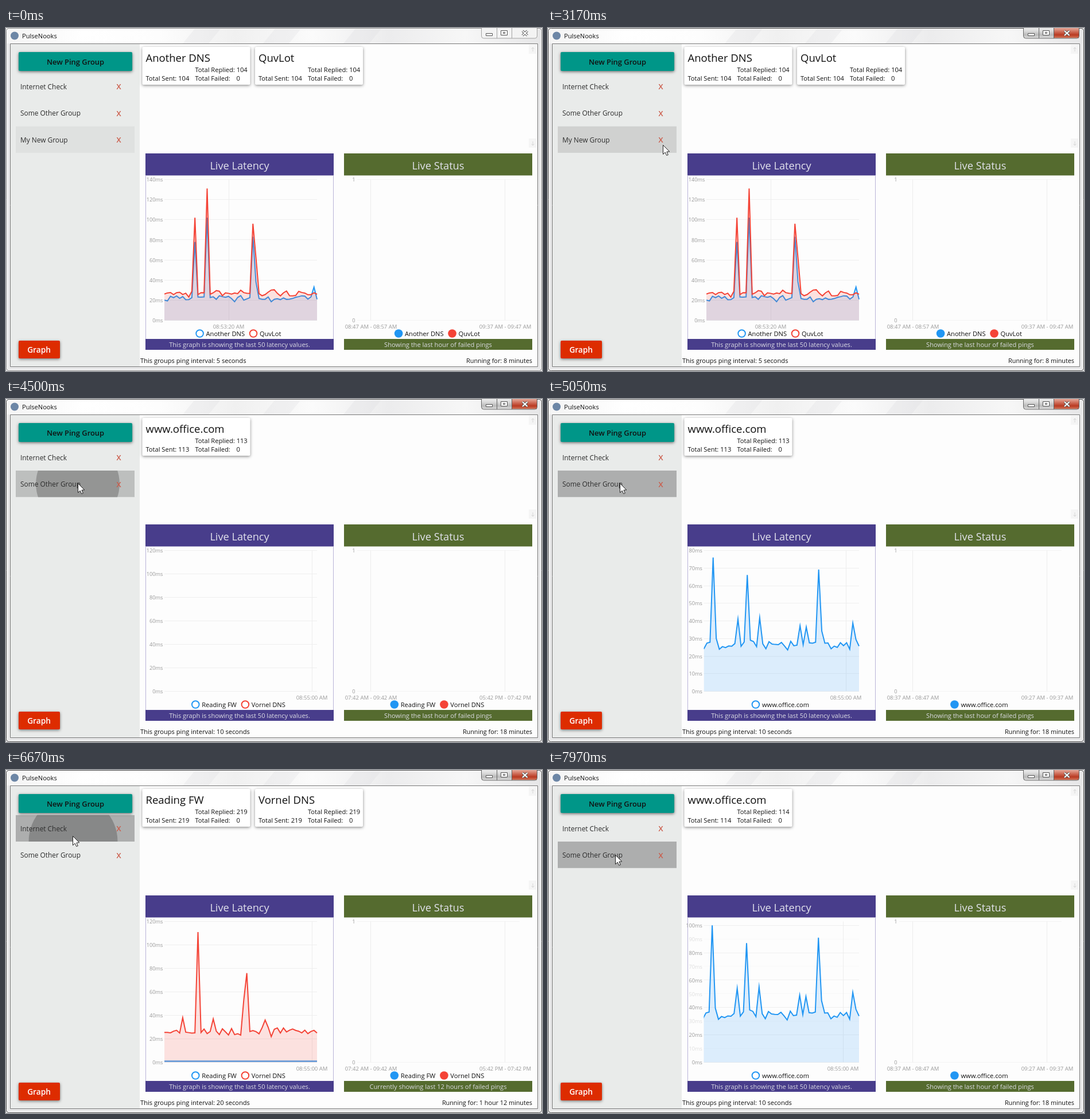
Recreate the animation shown at these times as an HTML page with a canvas. Size 934 px wide and 599 px high, loop 8 s.

```html
<!DOCTYPE html>
<html lang="en">
<head>
<meta charset="utf-8">
<title>Ping monitor</title>
<style>
html, body { margin: 0; width: 100%; height: 100%; overflow: hidden; background: #fff; }
canvas { display: block; }
</style>
</head>
<body>
<canvas id="stage" width="934" height="599"></canvas>
<script>
const ctx = document.getElementById('stage').getContext('2d');
const LOOP = 8000, STEPS = 50, BASE = 510.5, PLOT_HEIGHT = 246, PLOT_RIGHT = 542;
const BLUE = '#2196f3', RED = '#f44336', GREY = '#999';
const FACE = '"Open Sans", "Noto Sans", sans-serif';

const clamp = v => Math.max(0, Math.min(1, v));
const ramp = (t, from, to) => clamp((t - from) / (to - from));
const smooth = p => p * p * (3 - 2 * p);
const easeOut = p => 1 - (1 - p) ** 2;
const latest = (list, t) => list.filter(item => item.from <= t).pop();

// Latency wobbles around a base value; spikes are set by sample index.
function series(seed, base, spread, spikes = {}) {
  const random = () => (seed = seed * 16807 % 2147483647) / 2147483647;
  return Array.from({ length: STEPS + 1 }, (_, i) => {
    const wobble = base + spread * (random() + random() - 1);
    return spikes[i] ?? wobble;
  });
}

const dnsA = series(711, 22, 4, { 10: 78, 14: 102, 29: 83, 30: 38, 49: 33 });
const hubA = series(523, 27, 4, { 10: 102, 14: 131, 29: 96, 30: 62 });
const firewall = series(1, 1, 0);
const dnsB = series(919, 26, 5, { 6: 38, 11: 111, 16: 37, 26: 53, 27: 76, 33: 36 });
const office = series(337, 35, 5, { 3: 100, 11: 54, 14: 87, 18: 55, 31: 49, 33: 48, 37: 91, 38: 45, 48: 51 });

const HOUR = 'Showing the last hour of failed pings';
const HALF_DAY = 'Currently showing last 12 hours of failed pings';
const groupA = { names: ['Another DNS', 'QuvLot'], every: 5, run: '8 minutes', note: HOUR };
const groupB = { names: ['Reading FW', 'Vornel DNS'], every: 20, run: '1 hour 12 minutes', note: HALF_DAY };
const groupC = { names: ['www.office.com'], every: 10, run: '18 minutes', note: HOUR };

const viewA = { names: groupA.names, data: [dnsA, hubA], top: 140, step: 20, left: 276, tick: 388, time: '08:53:20 AM',
  spans: ['08:47 AM - 08:57 AM', '09:37 AM - 09:47 AM'] };
const viewB = { names: groupB.names, data: [firewall, dnsB], top: 120, step: 20, left: 276, tick: 533, time: '08:55:00 AM',
  spans: ['07:42 AM - 09:42 AM', '05:42 PM - 07:42 PM'] };
const viewC = { names: groupC.names, data: [office.map(v => v * 0.76)], top: 80, step: 10, left: 271.5, tick: 519,
  time: '08:55:00 AM', spans: ['08:37 AM - 08:47 AM', '09:27 AM - 09:37 AM'] };
const viewD = { ...viewC, data: [office], top: 102.8, step: 20, faintStep: 10, tick: 514, slide: 1.7 };

// A click swaps the cards and clears the chart; the new chart loads later.
const clicks = [
  { from: 0, group: groupA, count: 104, view: viewA, load: -500 },
  { from: 3340, group: groupB, count: 219, view: viewB, load: 3950 },
  { from: 4400, group: groupC, count: 113, view: viewC, load: 4710 },
  { from: 5590, group: groupB, count: 219, view: viewB, load: 6190 },
  { from: 7130, group: groupC, count: 114, view: viewD, load: 7890, rise: 80 }
];

const cursorMoves = [
  { from: 680, to: 980, x: 410, y: 530 },
  { from: 1150, to: 1460, x: 199, y: 365 },
  { from: 1610, to: 1690, x: 189, y: 264 },
  { from: 1690, to: 2240, x: 200, y: 204 },
  { from: 3640, to: 3870, x: 186, y: 197 },
  { from: 3900, to: 4480, x: 125, y: 147 },
  { from: 5050, to: 5450, x: 116, y: 115 },
  { from: 6850, to: 7060, x: 117, y: 148 }
];

const HOVER = .11, SELECTED = .26;
const rows = [
  { label: 'Internet Check', shades: [{ from: 5150, to: 5700, a: HOVER }, { from: 5590, to: 6900, a: SELECTED }],
    ripples: [{ from: 6585, x: 117, y: 124 }] },
  { label: 'Some Other Group', shades: [{ from: 4250, to: 5400, a: SELECTED }, { from: 7080, to: LOOP, a: SELECTED }],
    ripples: [{ from: 4420, x: 125, y: 148 }, { from: 7180, x: 117, y: 148 }] },
  { label: 'My New Group', shades: [{ from: -LOOP, to: LOOP, a: .045 }, { from: 1780, to: LOOP, a: HOVER }],
    ripples: [], removed: 3340 }
];

function box(x, y, w, h, fill) {
  ctx.fillStyle = fill;
  ctx.fillRect(x, y, w, h);
}

function text(str, x, y, { size = 11.1, color = '#111', align = 'left', weight = 400 } = {}) {
  ctx.font = `${weight} ${size}px ${FACE}`;
  ctx.textAlign = align;
  ctx.fillStyle = color;
  ctx.fillText(str, x, y);
}

function trace(points) {
  ctx.beginPath();
  points.forEach(([x, y]) => ctx.lineTo(x, y));
}

function line(points, color, width = 1) {
  trace(points);
  ctx.strokeStyle = color;
  ctx.lineWidth = width;
  ctx.stroke();
}

function polygon(points, fill) {
  trace(points);
  ctx.closePath();
  ctx.fillStyle = fill;
  ctx.fill();
}

function outline(x, y, w, h, color, radius = 0) {
  ctx.beginPath();
  ctx.roundRect(x, y, w, h, radius);
  ctx.strokeStyle = color;
  ctx.lineWidth = 1;
  ctx.stroke();
}

function raised(x, y, w, h, fill, alpha) {
  ctx.save();
  ctx.shadowColor = `rgba(0,0,0,${alpha})`;
  ctx.shadowBlur = 5;
  ctx.shadowOffsetY = 1.5;
  ctx.fillStyle = fill;
  ctx.beginPath();
  ctx.roundRect(x, y, w, h, 2);
  ctx.fill();
  ctx.restore();
}

function circle(x, y, r, fill, stroke) {
  ctx.beginPath();
  ctx.arc(x, y, r, 0, Math.PI * 2);
  ctx.fillStyle = fill;
  ctx.fill();
  if (!stroke) return;
  ctx.strokeStyle = stroke;
  ctx.lineWidth = 2;
  ctx.stroke();
}

function clipped(x, y, w, h, paint) {
  ctx.save();
  ctx.beginPath();
  ctx.rect(x, y, w, h);
  ctx.clip();
  paint();
  ctx.restore();
}

function gradient(x, y, ...colors) {
  const g = ctx.createLinearGradient(0, 0, x, y);
  colors.forEach((c, i) => g.addColorStop(i / (colors.length - 1), c));
  return g;
}

function drawWindow(active) {
  box(0, 0, 934, 599, '#e9e9ea');
  box(0, 0, 934, 27, gradient(934, 0, '#f4f4f4', '#fff', '#fdfdfd', '#f0f0f0', '#fbfbfb', '#ececed', '#f7f7f7', '#e6e6e7'));
  for (let x = 330; x < 700; x += 140) {
    polygon([[x, 0], [x + 45, 0], [x + 23, 27], [x - 22, 27]], 'rgba(215,215,218,.25)');
  }
  outline(1.5, 1.5, 931, 596, 'rgba(255,255,255,.7)', 5);
  outline(.5, .5, 933, 598, active ? '#4c4c4c' : '#8b8b8b', 5);
  box(7, 27, 920, 565, '#fdfdfd');
  box(8, 28, 225, 563, '#e9ebea');
  outline(7.5, 27.5, 919, 564, '#777');
  circle(15, 13.5, 7, '#6c86a6');
  text('PulseNooks', 28, 18);
  drawWindowButtons(active);
  drawScrollButton(29, -1);
  drawScrollButton(193, 1);
}

function drawWindowButtons(active) {
  const edge = active ? '#666' : '#a3a3a3';
  box(829, 0, 96, 17.5, active ? gradient(0, 18, '#ededed', '#d8d8d8', '#b9b9b9', '#e0e0e0') : '#f3f3f3');
  if (active) box(882, 0, 43, 17.5, gradient(0, 18, '#e6a99b', '#d0705c', '#b93a22', '#d6795c'));
  outline(828.5, -3, 97, 21, edge, 4);
  line([[855.5, 0], [855.5, 18]], edge);
  line([[881.5, 0], [881.5, 18]], edge);
  box(837, 10, 11, 3, '#fff');
  outline(836.5, 9.5, 11, 4, '#555');
  box(863, 5, 11, 8, '#fff');
  outline(862.5, 4.5, 11, 8, '#555');
  outline(866.5, 7.5, 3, 2, '#555');
  [['#555', 4], ['#fff', 2]].forEach(([color, width]) => {
    line([[900, 5], [908.5, 13]], color, width);
    line([[908.5, 5], [900, 13]], color, width);
  });
}

function drawScrollButton(y, dir) {
  const mid = y + 8.5;
  box(911, y, 14, 16, '#f5f5f5');
  line([[918, mid - 3.5], [918, mid + 3.5]], '#d5d5d5');
  line([[915.5, mid + dir], [918, mid + dir * 3.5], [920.5, mid + dir]], '#d5d5d5');
}

function drawRow(row, index, t) {
  if (t >= row.removed) return;
  const y = 78.5 + index * 46.5;
  const shade = Math.max(0, ...row.shades.map(s => s.a * ramp(t, s.from, s.from + 350) * (1 - ramp(t, s.to, s.to + 700))));
  clipped(17, y, 207, 46.5, () => {
    box(17, y, 207, 46.5, `rgba(0,0,0,${shade})`);
    row.ripples.filter(r => t >= r.from).forEach(r => {
      const age = t - r.from;
      circle(r.x, r.y, Math.min(150, age * .9), `rgba(0,0,0,${.22 * (1 - ramp(age, 280, 580))})`);
    });
  });
  text(row.label, 25, y + 28, { size: 11.9, color: '#2d2d2d' });
  text('X', 196.5, y + 28.5, { size: 13, color: '#cb5a48', align: 'center', weight: 600 });
}

function drawSidebar(t) {
  raised(22, 42, 198, 33, '#009688', .55);
  text('New Ping Group', 121, 64, { size: 12.9, align: 'center', weight: 600 });
  rows.forEach((row, i) => drawRow(row, i, t));
  raised(22, 546, 72, 31, '#dd2c00', .5);
  text('Graph', 57.5, 567, { size: 13.7, color: '#fff', align: 'center', weight: 600 });
}

function drawCards({ group, count }) {
  group.names.forEach((name, i) => {
    const x = 237.5 + i * 196.5;
    raised(x, 33, 188, 66, '#fff', .45);
    text(name, x + 6, 59, { size: 18.5 });
    text('Total Replied: ' + count, x + 92, 76.5);
    text('Total Sent: ' + count, x + 6, 92);
    text('Total Failed:', x + 92, 92);
    text('0', x + 164, 92);
  });
  text(`This groups ping interval: ${group.every} seconds`, 234, 585);
  text('Running for: ' + group.run, 917, 585, { size: 10.8, align: 'right' });
}

function drawPanel(x, color, title, note) {
  box(x, 219, 328, 38.5, color);
  text(title, x + 164, 247, { size: 18.2, color: '#e2e2ec', align: 'center' });
  box(x, 543, 328, 19, color);
  text(note, x + 164, 557, { color: '#dcdce4', align: 'center' });
}

function drawLegend(names, center, hollow) {
  const gap = 8, mark = 18;
  ctx.font = `400 11.1px ${FACE}`;
  const widths = names.map(name => mark + ctx.measureText(name).width);
  let x = center - (widths.reduce((a, b) => a + b) + gap * (names.length - 1)) / 2;
  names.forEach((name, i) => {
    const color = i ? RED : BLUE;
    if (hollow) circle(x + 7, 533.5, 6.3, '#fff', color);
    else circle(x + 7, 533.5, 7.3, color);
    text(name, x + mark, 538);
    x += widths[i] + gap;
  });
}

function drawSeries(left, top, values, color, grow) {
  const dx = (PLOT_RIGHT - left) / STEPS;
  const points = values.map((v, i) => [left + i * dx, BASE - v * grow * PLOT_HEIGHT / top]);
  ctx.globalAlpha = .15;
  polygon([[left, BASE], ...points, [PLOT_RIGHT, BASE]], color);
  ctx.globalAlpha = 1;
  line(points, color, 2);
}

function drawLatency(view, grow) {
  const { top, step, faintStep = step, left, slide = 0 } = view;
  [243.5, 570.5].forEach(x => line([[x, 258], [x, 543]], '#b9b4d8'));
  for (let v = 0; v <= top; v += faintStep) {
    const major = v % step === 0;
    const y = BASE - v * PLOT_HEIGHT / top;
    const gridY = Math.floor(y) + .5;
    line([[left, gridY], [PLOT_RIGHT, gridY]], major ? '#efefef' : '#f8f8f8');
    text(v + 'ms', left - 2.5, y + 3.7, { size: 9.2, color: major ? GREY : '#dedede', align: 'right' });
  }
  line([[view.tick + .5, 264.5], [view.tick + .5, BASE]], '#ededed');
  text(view.time, view.tick, 524.5, { size: 9.5, color: GREY, align: 'center' });
  if (grow > 0) {
    clipped(left, 258, PLOT_RIGHT + 1 - left, 254, () => {
      view.data.forEach((values, i) => drawSeries(left - slide, top, values, i ? RED : BLUE, grow));
    });
  }
  drawLegend(view.names, 405, true);
}

function drawStatus(view) {
  [['1', 264.5], ['0', BASE]].forEach(([label, y]) => {
    line([[612, y], [895, y]], '#f3f3f3');
    text(label, 606, y + 3.7, { size: 9.2, color: GREY, align: 'center' });
  });
  [636, 870].forEach((x, i) => {
    line([[x - .5, 264.5], [x - .5, BASE]], '#ededed');
    text(view.spans[i], x, 524.5, { size: 9.5, color: GREY, align: 'center' });
  });
  drawLegend(view.names, 751.5, false);
}

function drawCursor(t) {
  if (t < cursorMoves[0].from) return;
  let x = 543, y = 592;
  cursorMoves.forEach(move => {
    const p = smooth(ramp(t, move.from, move.to));
    x += (move.x - x) * p;
    y += (move.y - y) * p;
  });
  ctx.save();
  ctx.translate(x + .5, y + .5);
  polygon([[0, 0], [0, 16], [3.7, 12.6], [6.2, 18], [8.8, 17], [6.4, 11.6], [11.3, 11.3]], '#fff');
  ctx.strokeStyle = '#222';
  ctx.lineWidth = 1;
  ctx.stroke();
  ctx.restore();
}

function draw(t) {
  const click = latest(clicks, t);
  const loaded = t >= click.load;
  const view = loaded ? click.view : clicks[clicks.indexOf(click) - 1].view;
  const grow = loaded ? easeOut(ramp(t, click.load, click.load + (click.rise || 300))) : 0;
  drawWindow(t >= 3170);
  drawSidebar(t);
  drawCards(click);
  drawPanel(243, '#483d8b', 'Live Latency', 'This graph is showing the last 50 latency values.');
  drawPanel(589, '#556b2f', 'Live Status', click.group.note);
  drawLatency(view, grow);
  drawStatus(view);
  drawCursor(t);
}

function frame() {
  draw(performance.now() % LOOP);
  requestAnimationFrame(frame);
}
frame();
</script>
</body>
</html>
```
